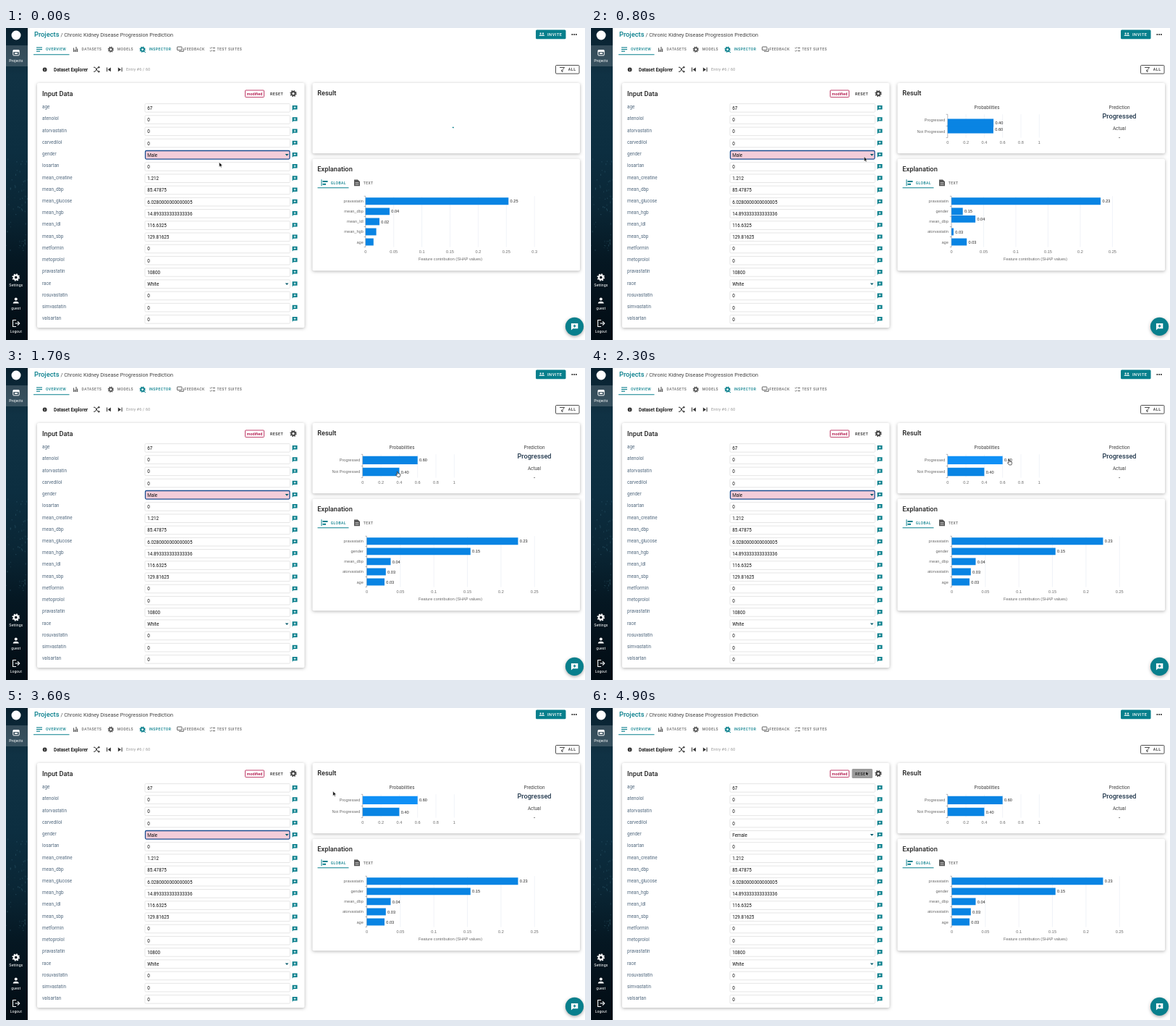
Write an HTML page with a canvas that moves like this. It is 800 by 431 pixels and loops after 5 s.

```html
<!DOCTYPE html>
<html lang="en">
<head>
<meta charset="utf-8">
<title>Prediction inspector</title>
<style>
html, body { margin: 0; width: 100%; height: 100%; overflow: hidden; background: #fff; }
canvas { display: block; width: 800px; height: 431px; }
</style>
</head>
<body>
<canvas id="stage"></canvas>
<script>
const canvas = document.getElementById('stage');
const g = canvas.getContext('2d');
const scale = window.devicePixelRatio || 1;
canvas.width = 800 * scale;
canvas.height = 431 * scale;

const LOOP = 5000, LOADED = 561;
const TEAL = '#087f8c', INK = '#222', GREY = '#6b6b6b', BLUE = '#0984e3', GRID = '#e0e6f1';
const UI = 'Roboto, sans-serif', CHART = '"Liberation Sans", Arial, sans-serif';

const clamp = v => Math.max(0, Math.min(1, v));
const lerp = (a, b, p) => a + (b - a) * p;
const ease = p => p < .5 ? 4 * p ** 3 : 1 - 4 * (1 - p) ** 3;
const smooth = p => p * p * (3 - 2 * p);

function rect(x, y, w, h, fill, r = 0, stroke, width = .7) {
  g.beginPath();
  g.roundRect(x, y, w, h, r);
  if (fill) { g.fillStyle = fill; g.fill(); }
  if (stroke) { g.strokeStyle = stroke; g.lineWidth = width; g.stroke(); }
}
function disc(x, y, r, fill) {
  g.beginPath();
  g.arc(x, y, r, 0, 7);
  g.fillStyle = fill;
  g.fill();
}
function shape(points, fill, stroke, width = .7) {
  g.beginPath();
  for (let i = 0; i < points.length; i += 2) g.lineTo(points[i], points[i + 1]);
  if (fill) { g.fillStyle = fill; g.fill(); }
  if (stroke) { g.strokeStyle = stroke; g.lineWidth = width; g.stroke(); }
}
const line = (x1, y1, x2, y2, color, width) => shape([x1, y1, x2, y2], null, color, width);

// y is the middle of the capitals
function text(s, x, y, size, color = INK, { weight = 400, align = 'left', space = 0, font = UI } = {}) {
  g.font = `${weight} ${size}px ${font}`;
  g.letterSpacing = space + 'px';
  g.textAlign = align;
  g.fillStyle = color;
  g.fillText(s, x, y + size * .355);
  g.letterSpacing = '0px';
}
const caps = (s, x, y, size, color) => text(s, x, y, size, color, { weight: 500, space: size * .09 });
const chartText = (s, x, y, align = 'left', color = GREY) => text(s, x, y, 5.6, color, { align, font: CHART });

function gear(x, y, r, color) {
  g.strokeStyle = color;
  g.lineWidth = r * .42;
  g.beginPath();
  g.arc(x, y, r * .58, 0, 2 * Math.PI);
  g.stroke();
  const tooth = 2 * Math.PI * r * .85 / 16;
  g.setLineDash([tooth, tooth]);
  g.beginPath();
  g.arc(x, y, r * .85, 0, 2 * Math.PI);
  g.stroke();
  g.setLineDash([]);
}
function bubble(x, y, s, fill, plus) {
  shape([x, y, x + s, y, x + s, y + s * .78, x + s * .25, y + s * .78, x, y + s], fill);
  const cx = x + s / 2, cy = y + s * .39, k = s * .21;
  line(cx - k, cy, cx + k, cy, plus, s * .13);
  line(cx, cy - k, cx, cy + k, plus, s * .13);
}
function person(x, y, k, color) {
  disc(x, y - 2 * k, 2 * k, color);
  g.beginPath();
  g.ellipse(x, y + 4 * k, 4 * k, 2.8 * k, 0, Math.PI, 0);
  g.fill();
}
function card(x, y, w, h) {
  g.save();
  g.shadowColor = 'rgba(0,0,0,.3)';
  g.shadowBlur = 4 * scale;
  g.shadowOffsetY = scale;
  rect(x, y, w, h, '#fff', 2);
  g.restore();
}

function sidebar() {
  const fill = g.createLinearGradient(0, 0, 0, 431);
  [[0, '#08202e'], [.15, '#103244'], [.4, '#0c2e40'], [.58, '#0a2635'], [.75, '#051722'], [1, '#020c14']]
    .forEach(([p, c]) => fill.addColorStop(p, c));
  rect(0, 0, 30, 431, fill);
  let seed = 7;
  const rnd = () => (seed = seed * 16807 % 2147483647) / 2147483647;
  for (let i = 0; i < 60; i++) {
    const x = rnd() * 29, y = 180 + rnd() * 130;
    rect(x, y, 1, 1 + rnd() * 2, `rgba(90,150,170,${.1 + rnd() * .25})`);
  }
  rect(0, 24, 30, 29, 'rgba(255,255,255,.17)');
  disc(14, 10, 6.5, '#fff');
  rect(9.8, 30.5, 8.4, 7.4, null, .8, '#fff', 1);
  rect(9.8, 30.5, 8.4, 2.6, '#fff');
  rect(12, 34.2, 4, 1.8, '#fff');
  gear(13.7, 344.5, 5, '#fff');
  person(13.7, 376.5, 1, '#fff');
  shape([14, 403.5, 9.5, 403.5, 9.5, 412.5, 14, 412.5], null, '#fff', 1.1);
  line(12.5, 408, 17.5, 408, '#fff', 1.1);
  shape([16, 405.3, 18.7, 408, 16, 410.7], null, '#fff', 1.1);
  [['Projects', 45], ['Settings', 355], ['guest', 387.5], ['Logout', 419]]
    .forEach(([s, y]) => text(s, 13.8, y, 5.2, '#fff', { align: 'center' }));
}

function header() {
  text('Projects', 39, 8.7, 9.3, TEAL, { weight: 500 });
  text('/ Chronic Kidney Disease Progression Prediction', 75.5, 9, 7.25, '#444');
  rect(732, 2.5, 41.5, 12.7, TEAL, 1.5);
  person(738.6, 8.6, .55, '#fff');
  person(742, 8.6, .55, '#fff');
  caps('INVITE', 748, 9, 5.7, '#fff');
  for (let i = 0; i < 3; i++) disc(782.3 + i * 2.8, 9, 1, INK);

  for (let i = 0; i < 3; i++) line(42, 27 + i * 2.6, 50 - (i == 2) * 3, 27 + i * 2.6, TEAL, 1.1);
  [5.5, 3, 7, 4.5].forEach((h, i) => rect(93 + i * 1.7, 33 - h, 1.1, h, '#555'));
  gear(144.8, 29.7, 3.9, '#555');
  gear(188.6, 29.7, 3.9, TEAL);
  line(190.5, 31.7, 193, 34, TEAL, 1);
  rect(236.5, 26, 6.5, 4.6, null, .5, '#555', .9);
  shape([239, 32.3, 245.3, 32.3, 245.3, 28.2], null, '#555', .9);
  for (let i = 0; i < 2; i++) {
    shape([281.8, 27.3 + i * 4, 282.8, 28.3 + i * 4, 284.5, 26.4 + i * 4], null, '#555', .8);
    line(285.5, 27.6 + i * 4, 289, 27.6 + i * 4, '#555', .9);
  }
  [['OVERVIEW', 55, TEAL], ['DATASETS', 104.5], ['MODELS', 153.7], ['INSPECTOR', 197.5, TEAL], ['FEEDBACK', 246.5], ['TEST SUITES', 291.5]]
    .forEach(([s, x, c]) => caps(s, x, 29.7, 5, c || GREY));
  rect(38, 36.2, 49.5, 1, TEAL);

  disc(53.6, 57.4, 2.9, '#333');
  line(53.6, 57, 53.6, 59, '#fff', .7);
  disc(53.6, 55.9, .4, '#fff');
  text('Dataset Explorer', 66, 57.4, 6.35, INK, { weight: 700 });
  shape([121, 54.3, 123, 54.3, 127, 60.2, 129, 60.2], null, '#333', 1);
  shape([121, 60.2, 123, 60.2, 127, 54.3, 129, 54.3], null, '#333', 1);
  shape([127.7, 52.6, 130, 54.3, 127.7, 56], '#333');
  shape([127.7, 58.5, 130, 60.2, 127.7, 61.9], '#333');
  rect(139, 54.5, 1, 5.8, '#333');
  shape([144.8, 54.5, 144.8, 60.3, 140.6, 57.4], '#333');
  rect(159.6, 54.5, 1, 5.8, '#333');
  shape([154.8, 54.5, 154.8, 60.3, 159, 57.4], '#333');
  text('Entry #6 / 60', 166, 57.4, 5.8, '#999');
  rect(759.5, 51.5, 32.5, 11.6, '#fff', 1.2, INK, .8);
  shape([765, 54.5, 771.6, 54.5, 769, 57.8, 769, 60.6, 767.6, 59.6, 767.6, 57.8], null, INK, .8);
  caps('ALL', 776.8, 57.4, 5.3, INK);
}

const FIELDS = [
  ['age', '67'], ['atenolol', '0'], ['atorvastatin', '0'], ['carvedilol', '0'], ['gender', 'Male'],
  ['losartan', '0'], ['mean_creatine', '1.212'], ['mean_dbp', '85.47875'], ['mean_glucose', '6.0280000000000005'],
  ['mean_hgb', '14.893333333333336'], ['mean_ldl', '116.6325'], ['mean_sbp', '129.81625'], ['metformin', '0'],
  ['metoprolol', '0'], ['pravastatin', '10800'], ['race', 'White'], ['rosuvastatin', '0'], ['simvastatin', '0'], ['valsartan', '0']
];

function inputs(reset) {
  card(43, 76, 369.5, 338);
  text('Input Data', 50, 90.5, 9.25, INK, { weight: 500 });
  rect(330.5, 86, 26, 9.6, '#fff', 1, '#b00f45', .8);
  text('modified', 343.5, 90.6, 5.5, '#b00f45', { weight: 500, align: 'center' });
  if (reset) rect(360.5, 84, 28.5, 13, '#9b9b9b', 1.5);
  caps('RESET', 365, 90.7, 5.3, INK);
  gear(397, 90.6, 4.4, '#444');
  FIELDS.forEach(([name, value], i) => {
    const y = 110.4 + i * 16.22;
    const select = name == 'gender' || name == 'race';
    text(name, 50, y - 1.4, 6.4, '#52697f');
    if (name == 'gender' && !reset) {
      rect(192.5, y - 5.8, 199.5, 11.6, '#f3cdd9', 1.5, '#1d4f91', 1.3);
    } else {
      rect(192, y - 5.8, 200.5, 11.6, '#fff', 1.2, '#dcdcdc', .7);
    }
    text(name == 'gender' && reset ? 'Female' : value, 195.2, y + .2, 6.35, '#111');
    if (select) shape([385.7, y - 1.2, 390.5, y - 1.2, 388.1, y + 1.4], '#06596b');
    bubble(395.6, y - 3.4, 6.9, TEAL, '#fff');
  });
}

function spinner(x, y, t) {
  const phase = t / 1440;
  const start = phase * 2 * Math.PI;
  g.beginPath();
  g.arc(x, y, 9.8, start, start + .14 + 4.9 * smooth(clamp(phase * 2)));
  g.strokeStyle = TEAL;
  g.lineWidth = 2;
  g.stroke();
}

function axes(x0, step, count, top, rows, rowH, label) {
  const bottom = top + rows * rowH;
  for (let i = 0; i <= count; i++) {
    const x = x0 + i * step;
    if (i) line(x, top, x, bottom, GRID, .5);
    chartText(label(i), x, bottom + 6.9, 'center');
  }
  line(x0, top, x0, bottom, '#6e7079', .5);
  for (let i = 0; i <= rows; i++) line(x0 - 2.2, top + i * rowH, x0, top + i * rowH, '#6e7079', .5);
}
function bar(x, y, w, h, label, color = BLUE) {
  rect(x, y - h / 2, w, h, color);
  chartText(label, x + w + 2.3, y + .1, 'left', '#222');
}

function result(t, u) {
  card(423.5, 76, 369.5, 97.3);
  text('Result', 430.3, 90, 9.25, INK, { weight: 500 });
  if (t < LOADED) return spinner(608, 136.8, t);
  const center = { align: 'center' };
  text('Probabilities', 547, 109.3, 6.3, '#444', center);
  const x0 = 492.8, unit = 126.5, swap = u ** 5;
  axes(x0, unit / 5, 5, 119.3, 2, 16.1, i => String(i / 5));
  chartText('Progressed', 489.3, 127.4, 'right');
  chartText('Not Progressed', 489.3, 143.5, 'right');
  const hover = t >= 2000 && t < 3700;
  bar(x0, lerp(143.5, 127.4, swap), lerp(.2, .6, u) * unit, 11.3, '0.60', hover ? '#0f90f6' : BLUE);
  bar(x0, lerp(127.4, 143.5, swap), lerp(.8, .4, u) * unit, 11.3, '0.40');
  text('Prediction', 730, 109.3, 6.4, '#444', center);
  text('Progressed', 730, 121.3, 9.2, '#22384d', { align: 'center', weight: 500 });
  text('Actual', 730, 139, 6.4, '#444', center);
  text('-', 730, 151, 8, INK, center);
}

// name, bar length before, bar length after, row before, label
const OLD = [['pravastatin', 197.5, '0.25'], ['mean_dbp', 33.2, '0.04'], ['mean_ldl', 19.2, '0.02'], ['mean_hgb', 14.8, ''], ['age', 11, '']];
const NEW = [
  ['pravastatin', 197.5, 209, 0, '0.23'], ['gender', 0, 143.3, 1, '0.15'], ['mean_dbp', 33.2, 33, 1, '0.04'],
  ['atorvastatin', 0, 26.3, 3, '0.03'], ['age', 11, 24.5, 4, '0.03']
];

function explanation(t, u, grow) {
  card(423.5, 180.7, 369.5, 154.5);
  text('Explanation', 430.3, 195, 9.25, INK, { weight: 500 });
  rect(435.5, 209.3, 1, 9, TEAL);
  rect(437.5, 211, 7, 2, TEAL);
  rect(437.5, 214.8, 4.5, 2, TEAL);
  caps('GLOBAL', 448.7, 214, 5, TEAL);
  rect(430.5, 220.3, 43, 1, TEAL);
  shape([481, 209.5, 486, 209.5, 489, 212.3, 489, 218.3, 481, 218.3], '#555');
  line(482.5, 213.7, 487.5, 213.7, '#fff', .7);
  line(482.5, 216, 487.5, 216, '#fff', .7);
  caps('TEXT', 493.7, 214, 5, GREY);
  if (t >= 100 && t < LOADED) return spinner(608, 278, t);

  const loaded = t >= LOADED, rowH = 14.06;
  const x0 = lerp(496.8, 498.5, u), rowY = i => 239.3 + i * rowH;
  axes(x0, lerp(38.9, 46.35, u), loaded ? 5 : 6, 232.3, 5, rowH, i => String(i * 5 / 100));
  (loaded ? NEW : OLD).forEach((d, i) => chartText(d[0], 493.8, rowY(i), 'right'));
  if (loaded) {
    NEW.forEach(([, from, to, row, label], i) =>
      bar(x0, rowY(lerp(row, i, u)), lerp(from, to, from ? u : grow), 9.9, label));
  } else {
    OLD.forEach(([, w, label], i) => bar(x0, rowY(i), w, 9.9, label));
  }
  chartText('Feature contribution (SHAP values)', 614, 318.7, 'center');
}

const PATH = [
  [0, 294.5, 185.5], [500, 294.5, 185.5], [800, 377.3, 177.8], [1200, 520, 147], [1700, 540, 143],
  [2000, 580, 129], [2300, 576.8, 126.5], [3000, 576.5, 127], [3600, 451.7, 115], [4200, 432, 106],
  [4700, 380, 88], [5000, 379.5, 87]
];
function cursor(t) {
  const i = PATH.findIndex(p => p[0] > t);
  const [t0, x0, y0] = PATH[i - 1], [t1, x1, y1] = PATH[i];
  const p = smooth((t - t0) / (t1 - t0));
  g.save();
  g.translate(lerp(x0, x1, p), lerp(y0, y1, p));
  g.lineJoin = 'round';
  if (t > 1200 && t <= 3000) {
    shape([.2, .3, 1.2, .3, 1.5, 2.6, 4.6, 3.2, 4.8, 5.2, 4, 7.4, 1, 7.4, -1.4, 4.6, -.8, 3.9, .3, 4.6, .2, .3], '#fff', '#222', .7);
  } else {
    shape([0, 0, 0, 6.4, 1.5, 5.1, 2.5, 7.3, 3.6, 6.8, 2.6, 4.7, 4.6, 4.6, 0, 0], '#111', '#fff', .5);
  }
  g.restore();
}

function draw(now) {
  const t = Math.floor(now % LOOP / 100) * 100;
  const u = ease(clamp((t - LOADED) / 397));
  const grow = ease(clamp((t - LOADED) / 794));
  g.setTransform(scale, 0, 0, scale, 0, 0);
  rect(0, 0, 800, 431, '#fff');
  sidebar();
  header();
  inputs(t >= 4900);
  result(t, u);
  explanation(t, u, grow);
  g.save();
  g.shadowColor = 'rgba(0,0,0,.35)';
  g.shadowBlur = 4 * scale;
  g.shadowOffsetY = 1.5 * scale;
  disc(785.5, 412.3, 12.6, TEAL);
  g.restore();
  bubble(780.9, 408, 9.4, '#fff', TEAL);
  cursor(t);
}

const begin = performance.now();
function tick() {
  draw(performance.now() - begin);
  requestAnimationFrame(tick);
}
tick();
</script>
</body>
</html>
```
